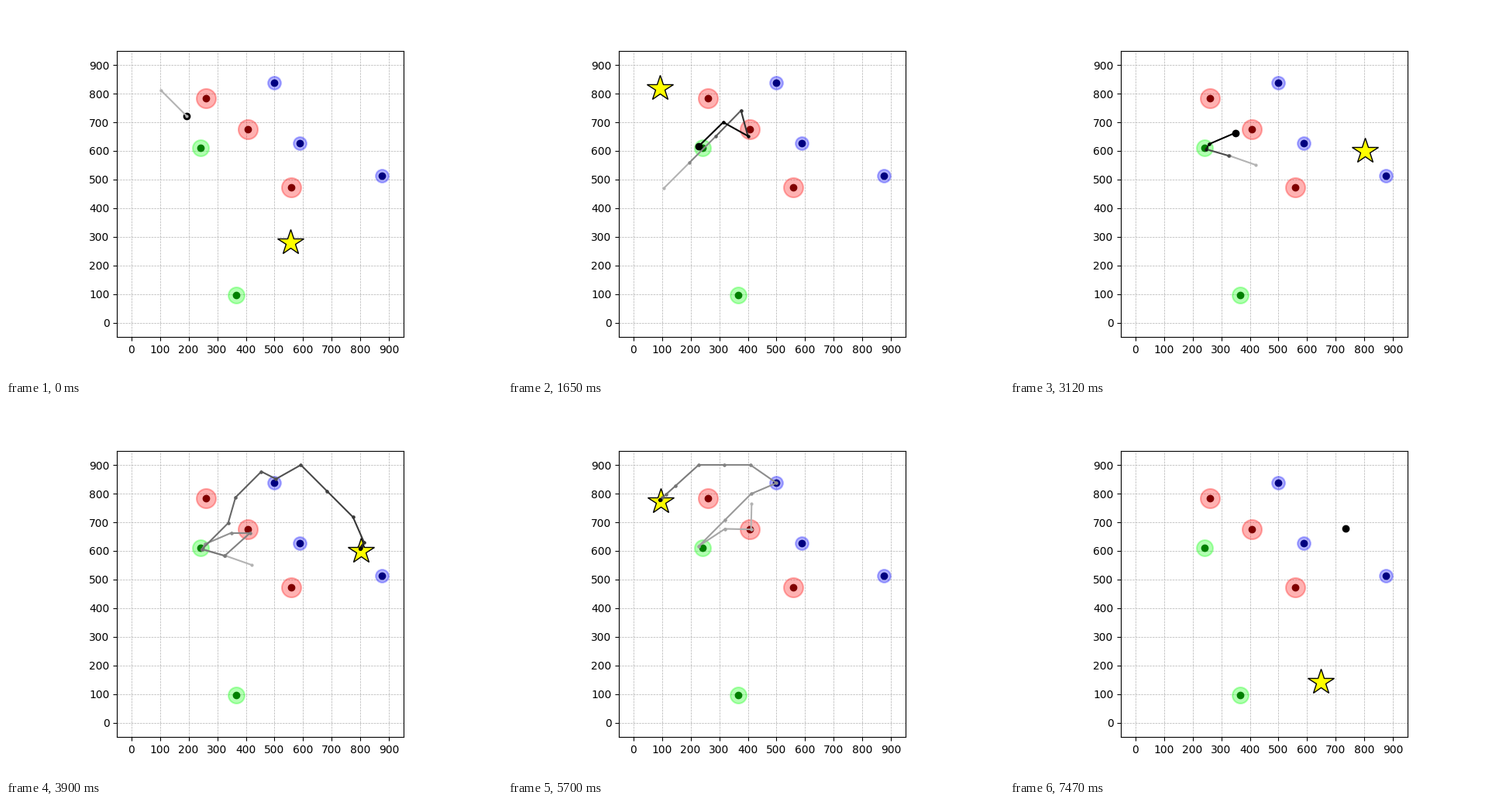
Animation, 640 px wide and 480 px high, one loop 7500 ms. Source, as a matplotlib script:

```python
import numpy as np
import matplotlib.pyplot as plt
from matplotlib.animation import FuncAnimation

STEPS = 50     # moves per episode
FRAMES = 250
REACH = 91     # largest move along either axis
GLIDE = 0.6    # share of the remaining way covered per move near the goal

# Way from the green stop over the blue one, shared by several episodes
EAST = [(247, 606), (364, 787), (454, 877), (505, 851)]
WEST = [(229, 617), (500, 837), (228, 900)]


def chase(start, stops, rest):
    """Walk through all stops with limited moves, then glide to rest."""
    track = [np.array(start, float)]
    for stop in stops:
        while np.any(track[-1] != stop):
            move = np.clip(stop - track[-1], -REACH, REACH)
            track.append(track[-1] + move)
    while len(track) < STEPS:
        move = GLIDE * (np.array(rest) - track[-1])
        track.append(track[-1] + np.clip(move, -REACH, REACH))
    return np.array(track)


# goal and track of each episode
episodes = [
    ((555, 281.5), chase((103, 812),
                         [(283, 639), (428, 678), (338, 588), *EAST,
                          (680, 672), (737, 582), (787, 402),
                          (710, 312), (655, 268)], (586, 254))),
    ((93, 818), chase((106, 469),
                      [(376, 741), (400, 652), (314, 700), *WEST],
                      (92, 815))),
    ((801, 601), chase((420, 551),
                       [(326, 583), EAST[0], (258, 624), (415, 663),
                        (326, 583), *EAST, (592, 900), (812, 631)],
                       (799, 608))),
    ((95, 774), chase((413, 765), [(411, 675), (320, 677), *WEST],
                      (93, 778))),
    ((395, 600), chase((670, 72),
                       [(400, 342), (393, 432), (285, 612), (234, 600),
                        (322, 690), (387, 658), (296, 584), (234, 600),
                        (322, 690), (360, 781), (451, 871), (498, 843)],
                       (393, 604))),
    ((647, 143), chase((735, 678), [], (647, 143))),
]

# halo colour, centre colour, halo size, places
groups = [
    ("#ff0000", "#800000", 18, [(260.5, 784), (407, 675), (558, 474)]),
    ("#00ff00", "#008000", 15, [(242, 611), (366, 96.5)]),
    ("#0000ff", "#000080", 12, [(499, 838), (587, 628), (875, 514)]),
]

fig, ax = plt.subplots(figsize=(6.4, 4.8), dpi=100)
ax.set_aspect("equal")
ax.set(xlim=(-50, 950), ylim=(-50, 950),
       xticks=range(0, 1000, 100), yticks=range(0, 1000, 100))
ax.grid(linestyle="--", linewidth=0.5)

for halo, core, size, places in groups:
    x, y = zip(*places)
    ax.plot(x, y, "o", color=halo, ms=size, mew=1.5, alpha=0.3, zorder=3)
    ax.plot(x, y, "o", color=core, ms=6, zorder=4)

agent, = ax.plot([], [], "o", color="black", ms=6, zorder=9)
# Later segments lie above the star, earlier ones below it
trail = [ax.plot([], [], "-o", ms=2, lw=1.5, zorder=10 + i)[0]
         for i in range(STEPS - 1)]
star, = ax.plot([], [], "*", ms=25, mfc="yellow", mec="black", zorder=20.5)


def update(n):
    ep, k = divmod(n + 1, STEPS)
    goal, track = episodes[ep]
    star.set_data([goal[0]], [goal[1]])
    agent.set_data(*track[k:k + 1].T)
    for i, seg in enumerate(trail):
        seg.set_visible(i < k)
        if i < k:
            seg.set_data(*track[i:i + 2].T)
            seg.set_color(str(max(0.0, 0.7 - i / k)))
    return [agent, star, *trail]


anim = FuncAnimation(fig, update, frames=FRAMES, interval=30,
                     repeat=True, repeat_delay=0)
plt.show()
```
